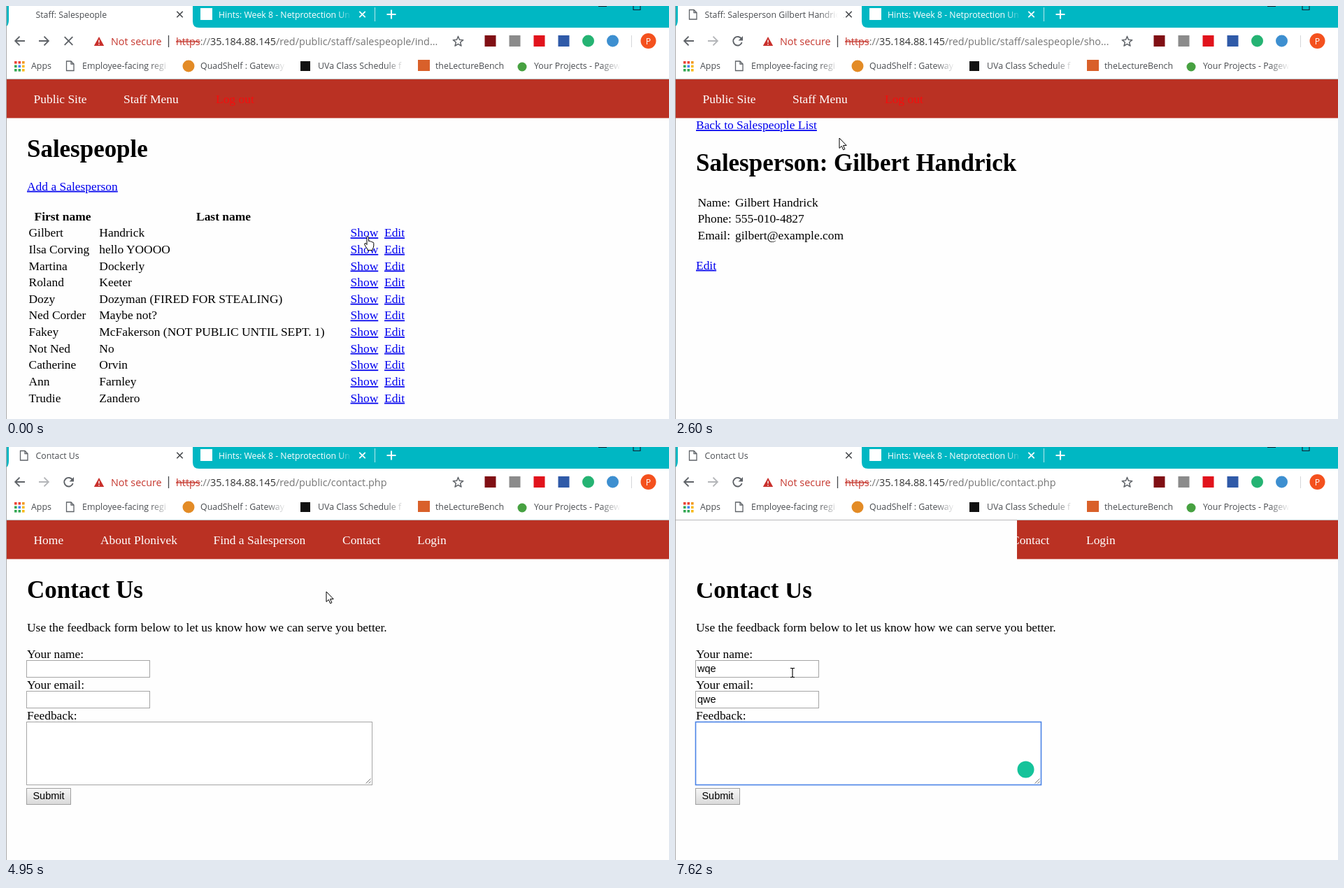
Recreate the animation shown at these times as an HTML page. Size 948 by 591 pixels, loop 8 s.

```html
<!DOCTYPE html>
<html lang="en">
<head>
<meta charset="utf-8">
<title>Staff walkthrough</title>
<style>
html, body { margin: 0; width: 100%; height: 100%; overflow: hidden; background: #fff; }
svg { display: block; width: 948px; height: 591px; }
text { white-space: pre; }
.ui { font: 12.3px "Open Sans", "Noto Sans", sans-serif; fill: #4a4d51; }
.bar { font: 14.4px "Open Sans", "Noto Sans", sans-serif; fill: #757575; }
.page { font: 17.45px "Liberation Serif", "Times New Roman", serif; fill: #000; }
.form { font: 14.5px "Liberation Sans", Arial, sans-serif; fill: #000; }
.h1 { font-size: 34.95px; font-weight: bold; }
.th { font-weight: bold; text-anchor: middle; }
.link { fill: #00e; text-decoration: underline; }
.nav { fill: #fff; }
.off { display: none; }
</style>
</head>
<body>
<svg id="stage" viewBox="0 0 948 591" xmlns="http://www.w3.org/2000/svg"></svg>
<script>
const stage = document.getElementById('stage');
const $ = id => document.getElementById(id);

// Markup helpers
const text = (x, y, s, cls = '', more = '') => `<text x="${x}" y="${y}" class="${cls}" ${more}>${s}</text>`;
const rect = (x, y, w, h, fill, more = '') => `<rect x="${x}" y="${y}" width="${w}" height="${h}" fill="${fill}" ${more}/>`;
const dot = (x, y, r, fill) => `<circle cx="${x}" cy="${y}" r="${r}" fill="${fill}"/>`;
const line = (d, color, w = 1, more = '') => `<path d="${d}" fill="none" stroke="${color}" stroke-width="${w}" ${more}/>`;
const group = (id, body, cls = '') => `<g id="${id}" class="${cls}">${body}</g>`;
const cross = (x, y, r, color, w) =>
  line(`M${x - r} ${y - r}L${x + r} ${y + r}M${x + r} ${y - r}L${x - r} ${y + r}`, color, w);
const sheet = (x, y) =>
  line(`M${x} ${y}h6.5l4 4v9.5h-10.500zM${x + 6.5} ${y}v4h4`, '#5f6368', 1.3);
const fade = (x, y, w, h, id) => rect(x, y, w, h, `url(#${id})`);
const gradient = (id, color) => `<linearGradient id="${id}">
  <stop offset="0" stop-color="${color}" stop-opacity="0"/><stop offset=".75" stop-color="${color}"/></linearGradient>`;

const TEAL = '#00b7c3', RED = '#ba3123', GREY = '#5f6368';

function star(cx, cy) {
  const pts = [];
  for (let i = 0; i < 10; i++) {
    const r = i % 2 ? 3.3 : 7.6, a = Math.PI * (i / 5 - .5);
    pts.push((cx + r * Math.cos(a)).toFixed(1) + ',' + (cy + r * Math.sin(a)).toFixed(1));
  }
  return `<polygon points="${pts.join(' ')}" fill="none" stroke="${GREY}" stroke-width="1.5" stroke-linejoin="round"/>`;
}

function tabs() {
  return rect(1, 0, 947, 31, TEAL) +
    '<path d="M4 0V20Q4 31 -5 31H276Q267 31 267 22V0Z" fill="#fff"/>' +
    text(42.5, 17, '', 'ui', 'id="title"') + fade(208, 2, 33, 24, 'fadeWhite') +
    cross(248.5, 12, 4.2, '#45484c', 1.6) +
    group('sheet', sheet(20.5, 5.5)) +
    '<circle id="spin" cx="25" cy="12" r="7" fill="none" stroke="#8a8f94" stroke-width="1.8" pathLength="100" transform="matrix(0 -1 -1 0 37 37)"/>' +
    rect(278, 3, 17, 17, '#fff') +
    text(304, 17, 'Hints: Week 8 - Netprotection Un', 'ui', 'style="fill:#fff"') + fade(474, 2, 27, 24, 'fadeTeal') +
    cross(509.5, 12, 4.2, '#fff', 1.7) + line('M527.5 2V22', '#b5e8ec') +
    line('M544.500 12H557.500M551 5.500V18.500', '#fff', 2.1) +
    line('M847 .5H859M897 0V5.500H907V0', '#123', 1.1);
}

function toolbar() {
  const exts = ['#800f14', '#8b8b8b', '#e1131c', '#2f5aa8', '#25b373', '#3d8fd0'];
  return rect(0, 31, 948, 74, '#fff') +
    line('M27 50H13.500M19.500 43.700L13.200 50L19.500 56.300', GREY, 1.9) +
    line('M47 50H60.500M54.500 43.700L60.800 50L54.500 56.300', GREY, 1.9, 'id="forward"') +
    group('stop', cross(89.5, 50, 5.8, GREY, 1.9)) +
    group('reload', line('M95 47A6.300 6.300 0 1 0 95.600 52', GREY, 1.9) +
      `<path d="M97 43V49.500H90.500Z" fill="${GREY}"/>`) +
    '<path d="M133 44L140.200 57H125.800Z" fill="#c9302c"/>' + line('M133 48.500V52.500M133 54V55.500', '#fff', 1.4) +
    text(150, 56, 'Not secure', 'bar', 'style="fill:#c5352c"') +
    line('M232.500 42V59', '#45484c', 1.3) +
    text(243, 56, '', 'bar', 'id="url"') + star(646.5, 51) +
    exts.map((c, i) => i < 4 ? rect(684.5 + 35 * i, 42, 16, 16, c) : dot(692.5 + 35 * i, 50, 8.5, c)).join('') +
    line('M894.500 42V59', '#d5d7da') + dot(918.5, 50, 11, '#f4511e') +
    text(918.5, 54.5, 'P', 'ui', 'text-anchor="middle" style="fill:#fff"');
}

function bookmarks() {
  const hues = ['#ea4335', '#ea4335', '#f29a1f', '#34a853', '#4285f4', '#f7b91c', '#34a853', '#34a853', '#f7b91c'];
  const items = [[36, 'Apps'], [109, 'Employee-facing regi'], [278, 'QuadShelf : Gateway'],
    [446, 'UVa Class Schedule f'], [614, 'theLectureBench'], [755, 'Your Projects - Pagew']];
  return items.map(([x, s]) => text(x, 90, s, 'ui', 'style="font-size:12.4px"')).join('') +
    [206, 372, 542, 850].map(x => fade(x, 76, 38, 20, 'fadeWhite')).join('') +
    hues.map((c, i) => rect(12 + 5.5 * (i % 3), 79 + 5.5 * Math.floor(i / 3), 3.6, 3.6, c)).join('') +
    sheet(86.5, 79) + dot(261, 86, 8.5, '#e38b26') + rect(421, 79, 14, 14, '#111') +
    rect(589, 77, 17, 16, '#d9602a') + dot(738, 87, 6.5, '#47a141') +
    line('M0 104.500H948', '#b9b9bb');
}

const nav = items => items.map(([x, s]) => text(x, 139.3, s, 'nav')).join('');

function listPage() {
  const people = [['Gilbert', 'Handrick'], ['Ilsa Corving', 'hello YOOOO'], ['Martina', 'Dockerly'],
    ['Roland', 'Keeter'], ['Dozy', 'Dozyman (FIRED FOR STEALING)'], ['Ned Corder', 'Maybe not?'],
    ['Fakey', 'McFakerson (NOT PUBLIC UNTIL SEPT. 1)'], ['Not Ned', 'No'], ['Catherine', 'Orvin'],
    ['Ann', 'Farnley'], ['Trudie', 'Zandero']];
  return text(30, 215.5, 'Salespeople', 'h1') + text(30, 263.7, 'Add a Salesperson', 'link') +
    text(81, 306.5, 'First name', 'th') + text(311, 306.5, 'Last name', 'th') +
    people.map(([first, last], i) => {
      const y = 330.2 + 23.65 * i;
      return text(32.5, y, first) + text(133.3, y, last) + text(492.5, y, 'Show', 'link') + text(541, y, 'Edit', 'link');
    }).join('');
}

function showPage() {
  const rows = [['Name:', 'Gilbert Handrick'], ['Phone:', '555-010-4827'], ['Email:', 'gilbert@example.com']];
  return text(30, 176.2, 'Back to Salespeople List', 'link') +
    text(30, 235.7, 'Salesperson: Gilbert Handrick', 'h1') +
    rows.map(([k, v], i) => text(32.5, 286.5 + 23.65 * i, k) + text(86, 286.5 + 23.65 * i, v)).join('') +
    text(30, 376.7, 'Edit', 'link');
}

function homePage() {
  return text(30, 215.5, 'Welcome to Plonivek!', 'h1') + [
    'Plonivek is a world-wide industry leader with many award-winning products',
    'which have become well-known household names. Our staff of experts are',
    'dedicated to finding synergies across a wide variety of vertical markets and',
    'integrating technology into everyday life.'
  ].map((s, i) => text(30, 263.7 + 20.15 * i, s)).join('');
}

// Form fields: x, y, width, height
const fields = { name: [29.5, 305.5, 176, 24], email: [29.5, 349.5, 176, 24], note: [29.5, 393.5, 494, 90] };

function contactPage() {
  return text(30, 215.5, 'Contact Us', 'h1') +
    text(30, 263.7, 'Use the feedback form below to let us know how we can serve you better.') +
    text(30, 301.5, 'Your name:') + text(30, 346, 'Your email:') + text(30, 389.7, 'Feedback:') +
    Object.values(fields).map(f => rect(...f, '#fff', 'stroke="#a5a5a5"')).join('') +
    line('M514.500 481.500L521.500 474.500M518.500 481.500L521.500 478.500', '#777') +
    rect(29.5, 488.5, 63, 23, 'url(#button)', 'stroke="#a0a0a0"') +
    text(61, 504.4, 'Submit', 'form', 'text-anchor="middle"') +
    text(32, 322, '', 'form', 'id="name"') + text(32, 366.2, '', 'form', 'id="email"') +
    '<rect id="focus" fill="none" stroke="#4a83e6" stroke-width="1.6"/>' +
    '<path id="caret" stroke="#000"/>' + group('badge', dot(501.5, 461.5, 12, '#15c39a'));
}

const cursors = {
  arrow: '<path d="M0 0V14.500L3.400 11.400L5.600 16.800L7.900 15.800L5.600 10.600H10.200Z" fill="#fff" stroke="#000" stroke-width="1"/>',
  hand: '<path d="M4 1.500Q5.300 0 6.600 1.500V7.500Q8.500 6.500 9.300 8.200Q11 7.500 11.600 9Q13.600 8.600 13.800 10.500V14Q13.600 17 12 19V20.500H5V19Q2.500 16 .8 12.500Q.2 10.500 2 10.500Q3 10.800 4 12.500Z" fill="#fff" stroke="#000"/>',
  beam: line('M-3 -6.500H-1L0 -5.500L1 -6.500H3M0 -5.500V5.500M-3 6.500H-1L0 5.500L1 6.500H3', '#000', 1.1)
};

const pages = {
  list: { title: 'Staff: Salespeople', path: 'staff/salespeople/ind...', staff: 1, body: listPage },
  show: { title: 'Staff: Salesperson Gilbert Handrick', path: 'staff/salespeople/sho...', staff: 1, body: showPage },
  home: { title: 'Plonivek', path: 'index.php', body: homePage },
  contact: { title: 'Contact Us', path: 'contact.php', body: contactPage }
};

stage.innerHTML = `<defs>${gradient('fadeWhite', '#fff')}${gradient('fadeTeal', TEAL)}
  <linearGradient id="button" x2="0" y2="1"><stop stop-color="#f7f7f7"/><stop offset="1" stop-color="#d9d9d9"/></linearGradient></defs>` +
  rect(0, 0, 948, 591, '#fefefe') + tabs() + toolbar() + bookmarks() + rect(1, 105, 947, 55.4, RED) +
  group('staffNav', nav([[39.5, 'Public Site'], [168, 'Staff Menu']]) +
    text(300, 139.3, 'Log out', '', 'style="fill:#f50d0d"'), 'page') +
  group('siteNav', nav([[39.5, 'Home'], [135, 'About Plonivek'], [296.5, 'Find a Salesperson'], [481, 'Contact'], [588, 'Login']]), 'page') +
  Object.keys(pages).map(k => group('page-' + k, pages[k].body(), 'page')).join('') +
  group('blank', rect(1, 105, 488, 90, '#fefefe')) +
  line('M.5 0V591', '#a9a9ab') +
  group('cursor', Object.keys(cursors).map(k => group('cur-' + k, cursors[k])).join(''));

// Each step changes part of the state and then holds
const at = (kind, x, y) => ({ kind, x, y });
const steps = [
  [0, { page: 'list', busy: 1, spin: 0, forward: 1, name: '', email: '', focus: '', caret: 0, badge: 0, blank: 0, ...at('hand', 512, 329) }],
  [120, { spin: 6 }],
  [260, { spin: 20 }],
  [390, { page: 'show', forward: 0, spin: 40 }],
  [530, { busy: 0, ...at('arrow', 500, 338) }],
  [670, at('arrow', 442, 346)],
  [800, at('arrow', 348, 350)],
  [940, at('arrow', 252, 349)],
  [1080, at('arrow', 188, 344)],
  [1210, at('arrow', 112, 318)],
  [1350, at('arrow', 48, 265)],
  [1490, at('arrow', 78, 200)],
  [1630, at('arrow', 140.5, 156)],
  [1780, at('arrow', 158, 144)],
  [1930, at('arrow', 164, 151)],
  [2210, at('hand', 176, 163)],
  [2340, at('arrow', 215, 178)],
  [2470, at('arrow', 235, 189)],
  [2610, at('arrow', 214, 180)],
  [2740, at('hand', 160, 160)],
  [2870, at('arrow', 122, 143)],
  [3010, at('hand', 98, 129)],
  [3140, at('hand', 90.5, 125)],
  [3580, { busy: 1, spin: 2 }],
  [3720, { spin: 15, ...at('hand', 102, 126) }],
  [3850, { page: 'home', spin: 35, ...at('arrow', 190, 149) }],
  [3990, { busy: 0, ...at('arrow', 310, 154) }],
  [4130, at('arrow', 420, 150)],
  [4260, at('hand', 482, 133)],
  [4400, at('hand', 501, 127)],
  [4800, { busy: 1, spin: 2 }],
  [4950, { page: 'contact', busy: 0, ...at('arrow', 458, 207) }],
  [5090, at('arrow', 416, 288)],
  [5220, at('arrow', 376, 365)],
  [5350, at('beam', 349, 424)],
  [5490, at('beam', 335, 455)],
  [5620, at('beam', 329, 466)],
  [6020, at('beam', 214, 362)],
  [6160, { focus: 'name', caret: 1, ...at('beam', 168, 323) }],
  [6300, { name: 'wqe' }],
  [6580, { focus: 'email' }],
  [6710, { email: 'q' }],
  [6840, { email: 'qwe' }],
  [7110, { focus: 'note' }],
  [7350, { badge: 1 }],
  [7620, { caret: 0, blank: 1 }]
];
let held = {};
const states = steps.map(([time, change]) => ({ time, s: held = { ...held, ...change } }));

const show = (id, on) => $(id).classList.toggle('off', !on);

function draw(s) {
  const page = pages[s.page];
  for (const k in pages) show('page-' + k, k === s.page);
  for (const k in cursors) show('cur-' + k, k === s.kind);
  $('cursor').setAttribute('transform', `translate(${s.x} ${s.y})`);
  $('title').textContent = page.title;
  $('url').innerHTML = '<tspan fill="#c5352c" text-decoration="line-through">https</tspan>://' +
    '<tspan fill="#333">35.184.88.145</tspan>/red/public/' + page.path;
  show('staffNav', page.staff);
  show('siteNav', !page.staff);
  show('stop', s.busy);
  show('reload', !s.busy);
  show('sheet', !s.busy);
  show('spin', s.busy && s.spin);
  $('spin').setAttribute('stroke-dasharray', `${s.spin} 100`);
  $('forward').setAttribute('stroke', s.forward ? GREY : '#b4b6b9');
  $('name').textContent = s.name;
  $('email').textContent = s.email;
  show('badge', s.badge);
  show('blank', s.blank);
  show('focus', s.focus);
  show('caret', s.focus && s.caret);
  if (s.focus) {
    const [x, y, w, h] = fields[s.focus];
    Object.entries({ x, y, width: w, height: h }).forEach(([k, v]) => $('focus').setAttribute(k, v));
    const typed = s.focus === 'note' ? 0 : $(s.focus).getComputedTextLength();
    $('caret').setAttribute('d', `M${x + 3 + Math.round(typed)} ${y + 4.5}v16`);
  }
}

const start = performance.now();
let last;
function tick() {
  const t = (performance.now() - start) % 8000;
  const now = states.filter(k => k.time <= t).pop() || states[0];
  if (now !== last) draw((last = now).s);
  requestAnimationFrame(tick);
}
tick();
</script>
</body>
</html>
```
